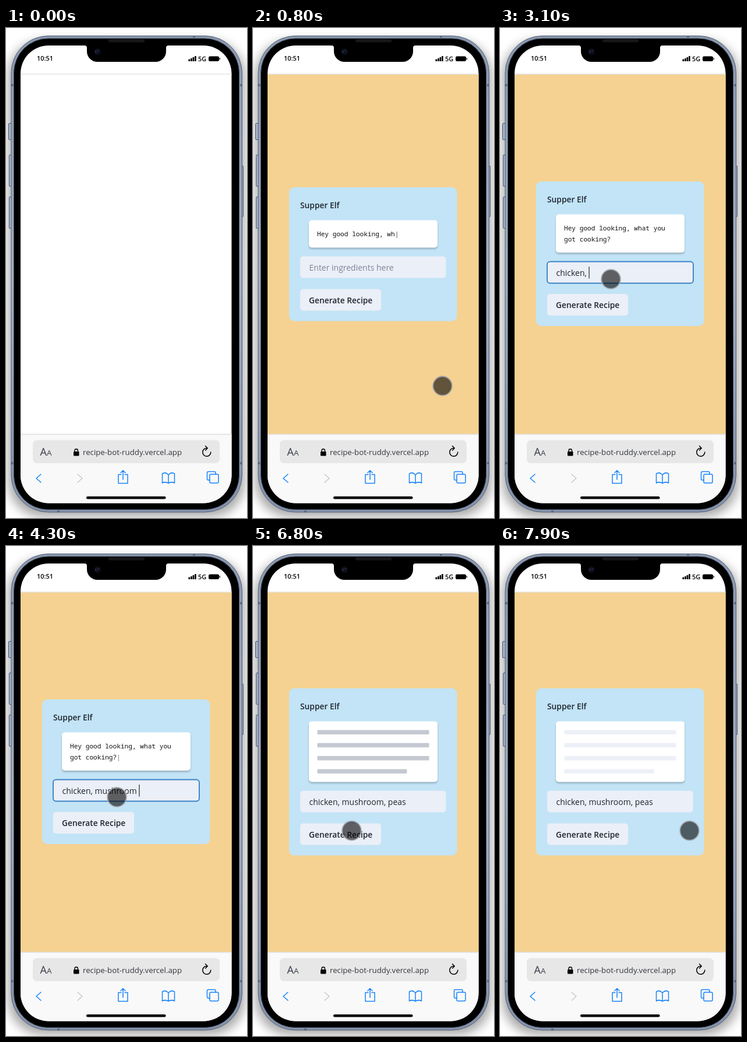
An HTML page for the animation above (8 s loop, 414 by 840 pixels).

```html
<!DOCTYPE html>
<html lang="en">
<head>
<meta charset="utf-8">
<style>
  html, body { margin: 0; width: 100%; height: 100%; overflow: hidden; background: #fff; }
  svg { display: block; width: 414px; height: 840px; }
  text { font: 14px "Open Sans", "Noto Sans", sans-serif; fill: #1f2530; white-space: pre; }
  .semi { font-weight: 600; font-size: 13.8px; }
  .status { font-weight: 600; font-size: 11px; fill: #000; }
  .mono { font: 11.15px "Noto Sans Mono", "DejaVu Sans Mono", monospace; fill: #111; }
  .icon { fill: none; stroke: #1683fb; stroke-width: 1.5; stroke-linecap: round; stroke-linejoin: round; }
  .field { fill: #ebeff7; }
</style>
</head>
<body>
<svg viewBox="0 0 414 840">
  <defs>
    <filter id="blur" x="-20%" y="-20%" width="140%" height="140%"><feGaussianBlur stdDeviation="9"/></filter>
    <filter id="soft" x="-10%" y="-30%" width="120%" height="160%"><feGaussianBlur stdDeviation="1.6"/></filter>
    <linearGradient id="steel" x2="0" y2="1">
      <stop offset="0" stop-color="#8b98ad"/><stop offset=".5" stop-color="#a3aec0"/><stop offset="1" stop-color="#8492a9"/>
    </linearGradient>
    <clipPath id="screen"><rect x="25" y="30" width="362.5" height="784.5" rx="48"/></clipPath>
    <clipPath id="address"><rect x="46" y="706.5" width="321" height="39.5" rx="7"/></clipPath>
  </defs>

  <!-- phone body -->
  <rect x="4" y="22" width="406" height="816" rx="60" fill="#000" opacity=".34" filter="url(#blur)"/>
  <g fill="#a9b5c8" stroke="#46536b">
    <rect x="4.5" y="163.5" width="6" height="28" rx="1.5"/>
    <rect x="5.5" y="217.5" width="5" height="54" rx="1.5"/>
    <rect x="5.5" y="289.5" width="5" height="54" rx="1.5"/>
    <rect x="403.5" y="236.5" width="4" height="87" rx="1.5"/>
  </g>
  <rect x="9" y="13.5" width="396.5" height="816.5" rx="64" fill="url(#steel)" stroke="#526078"/>
  <rect x="13.5" y="18" width="387" height="807.5" rx="59" stroke="#3d485d"/>
  <g fill="#5d6a80">
    <rect x="8.5" y="96" width="4" height="4"/><rect x="402" y="96" width="4" height="4"/>
    <rect x="8.5" y="744" width="4" height="4"/><rect x="402" y="744" width="4" height="4"/>
    <rect x="321" y="13" width="4" height="3.5"/><rect x="88" y="827" width="4" height="3.5"/>
  </g>
  <rect x="176" y="19.5" width="62" height="5" rx="2.5" fill="#171717"/>

  <g clip-path="url(#screen)">
    <rect x="25" y="30" width="363" height="785" fill="#fff"/>

    <g id="page">
      <rect x="25" y="79" width="363" height="617" fill="#f5d291"/>
      <rect id="card" x="62" width="288.5" rx="9" fill="#c2e4f6"/>
      <g id="upper">
        <text class="semi" x="81" y="35.5">Supper Elf</text>
        <rect id="shade" x="96" y="59" width="221" rx="5" opacity=".22" filter="url(#soft)"/>
        <rect id="bubble" x="96" y="56.5" width="221" rx="5" fill="#fff"/>
        <g id="speech">
          <text class="mono" x="110" y="83.5"></text>
          <text class="mono" x="110" y="102.5"></text>
          <text class="mono" id="bar">|</text>
        </g>
        <g id="bones">
          <rect x="110.5" y="71.5" width="192" height="7.5" rx="1.5"/>
          <rect x="110.5" y="93.8" width="192" height="7.5" rx="1.5"/>
          <rect x="110.5" y="116.1" width="192" height="7.5" rx="1.5"/>
          <rect x="110.5" y="138.4" width="154" height="7.5" rx="1.5"/>
        </g>
      </g>
      <g id="lower">
        <rect class="field" x="81" y="15" width="250.5" height="37" rx="5"/>
        <rect id="focus" x="81" y="15.5" width="251" height="37" rx="5" fill="none" stroke="#3c83c5" stroke-width="1.9"/>
        <text id="entry" x="96.5" y="39.5"></text>
        <rect id="caret" y="24" width="1" height="20.5"/>
        <rect class="field" x="81" y="71" width="139" height="37" rx="5"/>
        <text class="semi" x="96" y="95">Generate Recipe</text>
      </g>
      <circle id="touch" r="16.3" fill="#000" fill-opacity=".6" stroke="#a2a5aa" stroke-width="1.8"/>
    </g>

    <!-- status bar -->
    <path d="M25 79H388" stroke="#e4e4e4" stroke-width="1.5"/>
    <path d="M135 30Q139 30 139 34V40A18 18 0 0 0 157 58H257A18 18 0 0 0 275 40V34Q275 30 279 30Z"/>
    <circle cx="157" cy="40.5" r="5.5" fill="#0d0f1b"/>
    <path d="M154.5 39v3m4-4v2" stroke="#3a4468" stroke-width="1.3"/>
    <text class="status" x="53" y="56">10:51</text>
    <path d="M313.5 53.5h2.6V57h-2.6zm3.6-1.5h2.6v5h-2.6zm3.5-2h2.6v7h-2.6zm3.5-2h2.6v9h-2.6z"/>
    <text class="status" x="330" y="57">5G</text>
    <rect x="348" y="48.5" width="18" height="8.5" rx="2.5"/>
    <rect x="366.7" y="51" width="1.2" height="3.5" rx=".6"/>

    <!-- browser toolbar -->
    <rect x="25" y="696" width="363" height="119" fill="#f9f9f9"/>
    <path d="M25 696.5H388" stroke="#dedede" stroke-width="1.5"/>
    <g clip-path="url(#address)">
      <rect x="46" y="706" width="321" height="40" fill="#e7e7e7"/>
      <rect id="load" x="46" y="743.5" height="2.5" fill="#1683fb"/>
    </g>
    <text x="58.5" y="733" style="font-size:18px;fill:#3a3d4c">A<tspan style="font-size:13.5px">A</tspan></text>
    <rect x="116" y="726" width="9.5" height="7.5" rx="1.3"/>
    <path d="M118 727v-2.5a2.75 2.75 0 0 1 5.5 0V727" fill="none" stroke="#000" stroke-width="1.4"/>
    <text x="132" y="732" style="font-size:13.25px;fill:#33353f">recipe-bot-ruddy.vercel.app</text>
    <path class="icon" style="stroke:#000" d="M345.5 720.2A7 7 0 1 0 351.8 727M342.5 716.5L346.2 720.2L342.5 724"/>
    <path class="icon" d="M60 765L52 772L60 779"/>
    <path class="icon" style="stroke:#c8c8c8" d="M123 765L131 772L123 779"/>
    <path class="icon" d="M198 765.5H193V780.5H209V765.5H204M201 774V759M197 762.5L201 758.5L205 762.5"/>
    <path class="icon" d="M279 766Q274 760.5 268.5 764V780Q274 777 279 780.5Q284 777 289.5 780V764Q284 760.5 279 766V780.5"/>
    <path class="icon" d="M350 775H347.5Q345.5 775 345.5 773V762.5Q345.5 760.5 347.5 760.5H358Q360 760.5 360 762.5V765"/>
    <rect class="icon" x="350" y="765" width="15" height="15" rx="2"/>
    <rect x="138" y="803" width="136.5" height="4.5" rx="2.25"/>
  </g>
</svg>
<script>
const LOOP = 8000, LOADED = 100, FOCUS = 1200, SUBMIT = 6300;
const LINES = ["Hey good looking, what you ", "got cooking?"];
const CHAR = 6.69;

// "<" is a backspace
const KEYS = "chicken, mushroom <, peas";
const KEY_TIMES = [1300, 1400, 1500, 1600, 1700, 1800, 1900, 2900, 3100, 3500, 3700, 3800, 3900,
  4000, 4050, 4100, 4200, 4300, 4600, 4700, 4800, 5000, 5100, 5200, 5300];

// touch path: time, x, y
const PATH = [[700, 345, 640], [1150, 190.5, 430.5], [5950, 190.5, 430.5], [6220, 169.5, 488],
  [7350, 169.5, 488], [7800, 325.5, 488]];

const $ = id => document.getElementById(id);
const set = (el, attrs) => { for (const k in attrs) el.setAttribute(k, attrs[k]); };
const show = (el, on) => el.setAttribute("visibility", on ? "inherit" : "hidden");
const mix = (a, b, p) => a + (b - a) * p;
const clamp = p => Math.max(0, Math.min(1, p));
const ease = p => p * p * (3 - 2 * p);
const [line1, line2] = $("speech").children;

function drawSpeech(t) {
  const n = Math.min(39, Math.floor(5 + (t - 200) / 38));
  const wrapped = n > LINES[0].length;
  const col = wrapped ? n - LINES[0].length : n;
  line1.textContent = LINES[0].slice(0, n);
  line2.textContent = wrapped ? LINES[1].slice(0, col) : "";
  set($("bar"), {
    x: 110 + col * CHAR,
    y: wrapped ? 102.5 : 83.5,
    opacity: Math.abs(Math.sin(Math.PI * (t - 100) / 1000))
  });
  return wrapped ? 65.5 : 47;
}

function drawEntry(t, focused) {
  const pressed = KEY_TIMES.filter(k => k <= t);
  let typed = "";
  for (const key of KEYS.slice(0, pressed.length)) typed = key === "<" ? typed.slice(0, -1) : typed + key;
  const entry = $("entry");
  entry.textContent = typed || "Enter ingredients here";
  entry.style.fill = typed ? "" : "#7b8496";
  const recent = t - (pressed.at(-1) ?? FOCUS) < 300;
  show($("caret"), focused && (recent || Math.floor(t / 500) % 2));
  set($("caret"), { x: 96.5 + (typed ? entry.getComputedTextLength() : 0) });
}

function drawTouch(t) {
  show($("touch"), t >= PATH[0][0]);
  let [, x, y] = PATH[0];
  for (let i = 1; i < PATH.length; i++) {
    const [t0] = PATH[i - 1], [t1, x1, y1] = PATH[i];
    const p = ease(clamp((t - t0) / (t1 - t0)));
    x = mix(x, x1, p);
    y = mix(y, y1, p);
  }
  set($("touch"), { cx: x, cy: y });
}

function draw(t) {
  const loaded = t >= LOADED, waiting = t >= SUBMIT;
  const focused = t >= FOCUS && !waiting;
  show($("page"), loaded);
  show($("load"), loaded && t < 600);
  set($("load"), { width: 232 + clamp((t - 200) / 300) * 89 - clamp((200 - t) / 100) * 90 });
  if (!loaded) return;

  const speechHeight = drawSpeech(t);
  const height = waiting ? 104 : speechHeight;
  const top = Math.floor(387.5 - (height + 182) / 2);
  set($("card"), { y: top, height: height + 182.5 });
  set($("bubble"), { height });
  set($("shade"), { height });
  set($("upper"), { transform: `translate(0 ${top})` });
  set($("lower"), { transform: `translate(0 ${top + 56.5 + height})` });

  show($("speech"), !waiting);
  show($("bones"), waiting);
  const pulse = 1 - Math.abs(1 - (Math.max(0, t - SUBMIT) / 800) % 2);
  set($("bones"), { fill: `rgb(${mix(237, 171, pulse)} ${mix(240, 178, pulse)} ${mix(247, 188, pulse)})` });

  show($("focus"), focused);
  drawEntry(t, focused);
  drawTouch(t);
}

const start = performance.now();
function tick() {
  // hold each pose for a tenth of a second
  draw(Math.floor(((performance.now() - start) % LOOP) / 100) * 100);
  requestAnimationFrame(tick);
}
tick();
</script>
</body>
</html>
```
